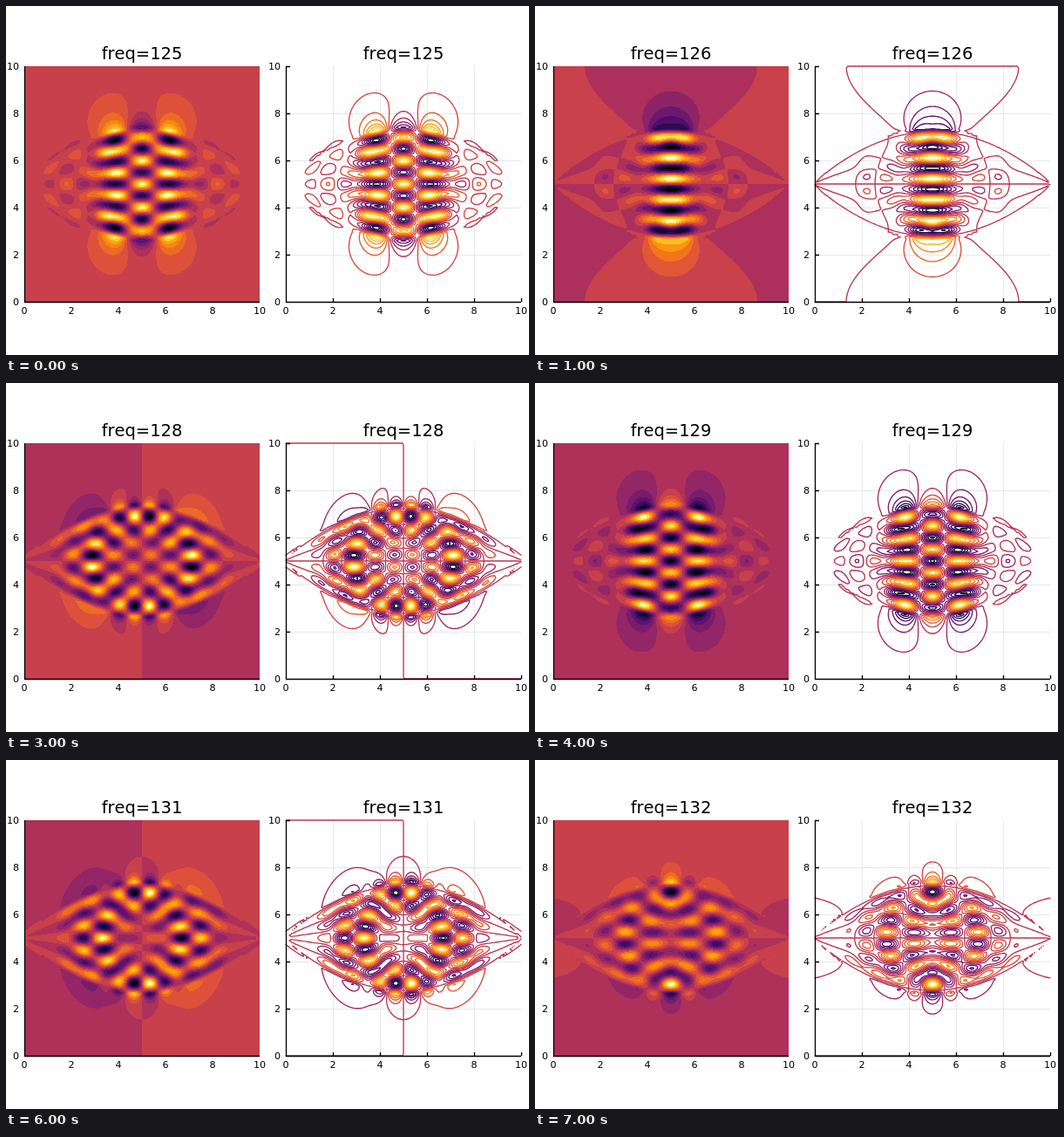
Write an HTML page with a canvas that moves like this. It is 600 by 400 pixels and loops after 8 s.

```html
<!DOCTYPE html>
<html lang="en">
<head>
<meta charset="utf-8">
<title>Mode contours</title>
<style>
html, body { margin: 0; width: 100%; height: 100%; overflow: hidden; background: #fff; }
canvas, svg { position: absolute; left: 0; top: 0; width: 600px; height: 400px; }
text { font-family: "DejaVu Sans", sans-serif; font-size: 11.1px; font-kerning: none; fill: #000; }
.title { font-size: 19.44px; text-anchor: middle; }
.mid { text-anchor: middle; }
.end { text-anchor: end; }
</style>
</head>
<body>
<canvas id="stage" width="600" height="400"></canvas>
<svg id="axes" viewBox="0 0 600 400"></svg>
<script>
const start = performance.now();
const SIZE = 270, TOP = 69, LEFT = [21, 321];
const CELLS = 135, NODES = CELLS + 1, HALF = NODES / 2, STEP = 10 / CELLS;
const { abs, cos, sin, atan, PI, min, max, floor, ceil } = Math;

const INFERNO = ['000004', '160b39', '420a68', '6a176e', '932667', 'bc3754',
  'dd513a', 'f37819', 'fca50a', 'f6d746', 'fcffa4']
  .map(h => [0, 2, 4].map(i => parseInt(h.slice(i, i + 2), 16)));
function inferno(t) {
  const p = min(max(t, 0), 1) * 10, i = min(floor(p), 9);
  return INFERNO[i].map((c, k) => Math.round(c + (INFERNO[i + 1][k] - c) * (p - i)));
}

// A lens-shaped cavity around the centre of a 10 x 10 box.
// Inside, a mode is a vertical standing wave (order p) times a slow profile along x (order n).
const EDGE = 1.075;
const height = x => 2.22 * (1 - x * x / 26);
const wave = (p, s) => (p % 2 ? cos : sin)(p * PI / 2 * s);

// Profile along x at half steps from the centre: bisect the energy until the node count fits.
function profile(p, n) {
  const ds = STEP / 2, odd = n % 2;
  const wall = Array.from({ length: NODES }, (_, i) => (p * PI / 2 / height(i * ds)) ** 2);
  const shoot = energy => {
    const f = [odd ? 0 : 1, odd ? ds : 1 + (wall[0] - energy) * ds * ds / 2];
    let nodes = 0;
    for (let i = 1; i < NODES - 1; i++) {
      f[i + 1] = 2 * f[i] - f[i - 1] + ds * ds * (wall[i] - energy) * f[i];
      if (f[i + 1] * f[i] < 0) nodes++;
    }
    return { f, nodes };
  };
  let low = wall[0], high = 200;
  for (let k = 0; k < 50; k++) {
    const energy = (low + high) / 2;
    if (shoot(energy).nodes > floor(n / 2)) high = energy; else low = energy;
  }
  const { f } = shoot(low);
  let end = 1;
  while (end < NODES && (wall[end] < low || abs(f[end]) <= abs(f[end - 1]))) end++;
  f.fill(0, end);
  const norm = Math.sqrt(f.reduce((sum, v) => sum + v * v * ds, 0));
  return f.map(v => v / norm);
}

// Each mode mixes a chain of nearly degenerate waves: (p, n), (p - 2, n + 4), ...
// bins: colour count, zero: where the value 0 falls among them.
const MODES = [
  { p: 9, n: 2, mix: [1, 0.12, -0.16, 0.16], bins: 16, zero: 8.5 },
  { p: 10, n: 0, mix: [1, 0.15, -0.16, 0.16], bins: 14, zero: 7 },
  { p: 9, n: 2, mix: [-0.55, 0.75, -0.45, 0.3], bins: 15, zero: 6.5 },
  { p: 8, n: 5, mix: [0.8, -0.5, 0.3], bins: 16, zero: 8 },
  { p: 9, n: 2, mix: [-1, -0.12, 0.16, -0.16], bins: 16, zero: 7.5 },
  { p: 10, n: 0, mix: [-1, -0.15, 0.16, -0.16], bins: 14, zero: 7 },
  { p: 9, n: 3, mix: [0.6, -0.7, 0.4], bins: 16, zero: 8 },
  { p: 10, n: 0, mix: [-0.5, 0.8, -0.45, 0.3], bins: 16, zero: 8 }
];

function sample({ p, n, mix, bins, zero }) {
  const parts = mix.map((c, k) => ({ c, p: p - 2 * k, f: profile(p - 2 * k, n + 4 * k) }));
  const inside = (a, s) => parts.reduce((sum, w) => sum + w.c * w.f[2 * a + 1] * wave(w.p, s), 0);
  const flipX = n % 2 ? -1 : 1, flipY = p % 2 ? 1 : -1;
  const fold = i => i < HALF ? HALF - 1 - i : i - HALF;

  // Outside, the rim values decay as a harmonic field that vanishes at the box wall.
  const rim = Array.from({ length: NODES }, (_, i) => inside(fold(i), EDGE) * (i < HALF ? flipX : 1));
  const spread = (x, d) => {
    let sum = 0, before = atan((-5 - STEP / 2 - x) / d);
    for (let i = 0; i < NODES; i++) {
      const after = atan((-5 + (i + 0.5) * STEP - x) / d);
      sum += rim[i] * (after - before);
      before = after;
    }
    return sum / PI;
  };

  const quarter = [];
  let high = 0, low = 0;
  for (let b = 0; b < HALF; b++) {
    for (let a = 0; a < HALF; a++) {
      const x = (a + 0.5) * STEP, y = (b + 0.5) * STEP, h = height(x);
      const d = y - EDGE * h, wall = 5 - EDGE * h;
      const v = d < 0 ? inside(a, y / h) : spread(x, max(d, 1e-6)) - spread(x, 2 * wall - d);
      quarter.push(v);
      high = max(high, v);
      low = min(low, v);
    }
  }
  if (flipX < 0 || flipY < 0) low = -(high = max(high, -low));
  const scale = min((bins - zero) / high, -zero / low);

  const grid = new Float32Array(NODES * NODES);
  for (let j = 0; j < NODES; j++) {
    for (let i = 0; i < NODES; i++) {
      const flip = (i < HALF ? flipX : 1) * (j < HALF ? 1 : flipY);
      grid[j * NODES + i] = zero + scale * flip * quarter[fold(j) * HALF + fold(i)];
    }
  }
  return grid;
}

function fillBands(ctx, grid, bins) {
  const image = ctx.createImageData(SIZE, SIZE);
  const colors = Array.from({ length: bins }, (_, i) => inferno(i / (bins - 1)));
  const scale = CELLS / SIZE;
  for (let y = 0, p = 0; y < SIZE; y++) {
    const gy = (y + 0.5) * scale, j = floor(gy), v = gy - j;
    for (let x = 0; x < SIZE; x++, p += 4) {
      const gx = (x + 0.5) * scale, i = floor(gx), u = gx - i, n = j * NODES + i;
      const z = (grid[n] * (1 - u) + grid[n + 1] * u) * (1 - v)
        + (grid[n + NODES] * (1 - u) + grid[n + NODES + 1] * u) * v;
      image.data.set(colors[min(max(floor(z), 0), bins - 1)], p);
      image.data[p + 3] = 255;
    }
  }
  ctx.putImageData(image, LEFT[0], TOP);
}

const CORNERS = [[0, 0], [1, 0], [1, 1], [0, 1]];
function strokeLevels(ctx, grid, bins) {
  const paths = Array.from({ length: bins }, () => new Path2D());
  const step = SIZE / CELLS;
  for (let j = 0; j < CELLS; j++) {
    for (let i = 0; i < CELLS; i++) {
      const z = CORNERS.map(([u, v]) => grid[(j + v) * NODES + i + u]);
      const last = min(floor(max(...z)), bins - 1);
      for (let l = max(ceil(min(...z)), 1); l <= last; l++) {
        const hits = [];
        for (let k = 0; k < 4; k++) {
          const m = (k + 1) % 4;
          if ((z[k] >= l) === (z[m] >= l)) continue;
          const t = (l - z[k]) / (z[m] - z[k]), [a, b] = CORNERS[k], [c, d] = CORNERS[m];
          hits.push([LEFT[1] + (i + a + (c - a) * t) * step, TOP + (j + b + (d - b) * t) * step]);
        }
        for (let k = 0; k + 1 < hits.length; k += 2) {
          paths[l].moveTo(...hits[k]);
          paths[l].lineTo(...hits[k + 1]);
        }
      }
    }
  }
  ctx.lineWidth = 1.35;
  ctx.lineCap = 'round';
  paths.forEach((path, l) => {
    ctx.strokeStyle = `rgb(${inferno((l - 0.5) / (bins - 1))})`;
    ctx.stroke(path);
  });
}

function render(mode) {
  const canvas = document.createElement('canvas');
  canvas.width = 600;
  canvas.height = 400;
  const ctx = canvas.getContext('2d');
  ctx.fillStyle = '#fff';
  ctx.fillRect(0, 0, 600, 400);
  const grid = sample(mode);
  fillBands(ctx, grid, mode.bins);
  ctx.fillStyle = '#e8e8e8';
  for (let k = 54; k < SIZE; k += 54) {
    ctx.fillRect(LEFT[1] + k, TOP, 1, SIZE);
    ctx.fillRect(LEFT[1], TOP + k, SIZE, 1);
  }
  strokeLevels(ctx, grid, mode.bins);
  return canvas;
}

function drawAxes() {
  let out = '';
  for (const left of LEFT) {
    let ticks = '';
    for (let k = 0; k <= 10; k += 2) {
      const x = left + k * 27, y = TOP + SIZE - k * 27;
      out += `<text class="mid" x="${x}" y="352.5">${k}</text>`;
      out += `<text class="end" x="${left - 6}" y="${y + 4}">${k}</text>`;
      if (left === LEFT[1]) ticks += `M${x + 0.5} 339v-4M${left} ${y + 0.5}h5`;
    }
    out += `<path d="M${left + 0.5} ${TOP}V339.5H${left + SIZE}${ticks}" fill="none" stroke="#000" stroke-width="1.35"/>`;
    out += `<text class="title" x="${left + 135}" y="61"></text>`;
  }
  const svg = document.getElementById('axes');
  svg.innerHTML = out;
  return svg.querySelectorAll('.title');
}

const stage = document.getElementById('stage').getContext('2d');
const titles = drawAxes();
const pages = [];
let shown = -1;

function show(i) {
  if (i === shown) return;
  shown = i;
  pages[i] = pages[i] || render(MODES[i]);
  stage.drawImage(pages[i], 0, 0);
  titles.forEach(t => { t.textContent = 'freq=' + (125 + i); });
}

function tick() {
  show(floor((performance.now() - start) / 1000) % MODES.length);
  requestAnimationFrame(tick);
}

show(0);
MODES.forEach((mode, i) => { pages[i] = pages[i] || render(mode); });
tick();
</script>
</body>
</html>
```
